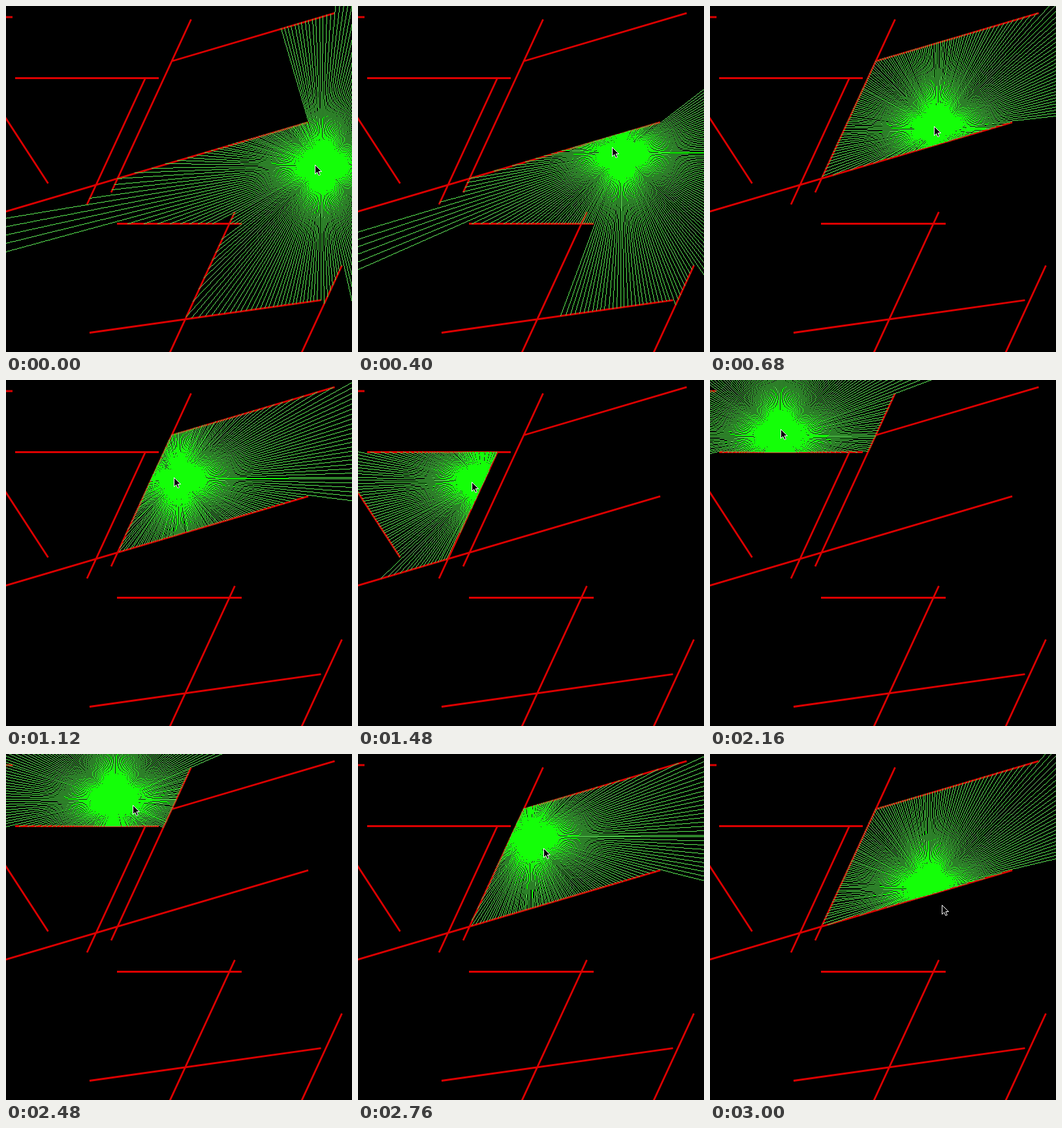
Recreate the animation shown at these times as an HTML page with a canvas. Size 530x530 px, loop 3040 ms.

```html
<!DOCTYPE html>
<html lang="en">
<head>
<meta charset="utf-8">
<title>Ray casting</title>
<style>
  html, body { margin: 0; width: 100%; height: 100%; overflow: hidden; background: #000; }
  canvas { display: block; width: 530px; height: 530px; }
</style>
</head>
<body>
<canvas id="stage" width="530" height="530"></canvas>
<script>
const SIZE = 530, LOOP = 3040, TICK = 40;
const LAG = 65;       // ms the light trails behind the pointer
const STEP = 0.025;   // radians between rays
const REACH = 900;
const GREEN = [20, 255, 8], GREY = 150;

// Most walls share one of three directions
const wall = (x, y, dx, slope) => ({ x, y, dx, dy: dx * slope });
const level = (x, y, width) => wall(x, y, width, 0);
const rising = (x, y, width) => wall(x, y, width, -0.295);
const steep = (x, y, height) => wall(x, y, -height / 2.165, -2.165);

const walls = [
  level(-90, 16.5, 100), level(14, 110, 220), level(170, 333, 191),
  rising(-140, 355.5, 603), rising(254, 84, 249.5),
  steep(283.5, 20, 265), steep(213, 111, 192.5), steep(350.5, 315, 240), steep(514.5, 397, 160),
  wall(-65.5, 71, 130, 1.54), wall(128, 500, 354.5, -0.141)
];

// Key poses: time, light position, lead of the pointer over the light
const path = [
  [0, 483, 244, -10, -1],
  [400, 403, 225, -14, -9],
  [680, 348, 188, -5, -4],
  [1120, 264, 151, -7, -2],
  [1840, 124, 142, -4, -8],
  [2480, 167, 70, 27, 8],
  [3000, 335, 206, 20, 25]
].map(([t, x, y, leadX, leadY]) => ({ t, x, y, vx: leadX / LAG, vy: leadY / LAG }));

const ctx = document.getElementById('stage').getContext('2d');
const layer = new OffscreenCanvas(SIZE, SIZE);
const layerCtx = layer.getContext('2d');
const image = layerCtx.createImageData(SIZE, SIZE);
const lit = new Uint8Array(SIZE * SIZE);

// Aliased line into the light mask
function line(x1, y1, x2, y2) {
  const dx = x2 - x1, dy = y2 - y1;
  const n = Math.max(Math.abs(dx), Math.abs(dy)) || 1;
  for (let i = 0; i <= n; i++) {
    const x = Math.round(x1 + dx * i / n), y = Math.round(y1 + dy * i / n);
    if (x < 0 || y < 0 || x >= SIZE || y >= SIZE) return;
    lit[y * SIZE + x] = 1;
  }
}

// Distance along the ray to the nearest wall
function cast(px, py, ux, uy) {
  let best = REACH;
  for (const w of walls) {
    const det = ux * w.dy - uy * w.dx;
    if (!det) continue;
    const qx = w.x - px, qy = w.y - py;
    const along = (qx * w.dy - qy * w.dx) / det;
    const part = (qx * uy - qy * ux) / det;
    if (along > 0 && part >= 0 && part <= 1) best = Math.min(best, along);
  }
  return best;
}

// Colour is shared by 2x2 blocks, so lone rays look paler than dense ones
function shade() {
  const data = image.data;
  for (let y = 0; y < SIZE; y++) {
    for (let x = 0; x < SIZE; x++) {
      const i = y * SIZE + x, b = (y & ~1) * SIZE + (x & ~1);
      const density = (lit[b] + lit[b + 1] + lit[b + SIZE] + lit[b + SIZE + 1]) / 4;
      const tint = lit[i] ? density : 1;
      for (let c = 0; c < 3; c++) data[i * 4 + c] = GREY + (GREEN[c] - GREY) * tint;
      data[i * 4 + 3] = lit[i] ? 255 : density * 105;
    }
  }
  layerCtx.putImageData(image, 0, 0);
}

// Cubic Hermite value and slope
function hermite(a, b, va, vb, span, s) {
  const ma = va * span, mb = vb * span;
  const c2 = 3 * (b - a) - 2 * ma - mb, c3 = 2 * (a - b) + ma + mb;
  return [
    a + s * (ma + s * (c2 + s * c3)),
    (ma + s * (2 * c2 + s * 3 * c3)) / span
  ];
}

function pose(time) {
  let i = 0;
  while (i < path.length - 2 && time >= path[i + 1].t) i++;
  const p = path[i], q = path[i + 1];
  const span = q.t - p.t, s = (time - p.t) / span;
  const [x, vx] = hermite(p.x, q.x, p.vx, q.vx, span, s);
  const [y, vy] = hermite(p.y, q.y, p.vy, q.vy, span, s);
  return [x, y, x + vx * LAG, y + vy * LAG].map(Math.round);
}

function drawWalls() {
  ctx.strokeStyle = '#dc0000';
  ctx.lineWidth = 2.8;
  ctx.beginPath();
  for (const w of walls) {
    ctx.moveTo(w.x, w.y + 0.5);
    ctx.lineTo(w.x + w.dx, w.y + w.dy + 0.5);
  }
  ctx.stroke();
}

function drawRays(x, y) {
  lit.fill(0);
  for (let a = 0; a < Math.PI * 2; a += STEP) {
    const ux = Math.cos(a), uy = Math.sin(a);
    const d = cast(x, y, ux, uy);
    line(x, y, Math.trunc(x + ux * d), Math.trunc(y + uy * d));
  }
  shade();
  ctx.drawImage(layer, 0, 0);
}

const arrow = new Path2D('M.5 .5V14.5L3.7 11.5L6 16.5L8.3 15.5L6.1 10.5H10.5Z');

function drawPointer(x, y) {
  ctx.save();
  ctx.translate(x, y);
  ctx.fillStyle = '#000';
  ctx.strokeStyle = '#fff';
  ctx.lineWidth = 1;
  ctx.fill(arrow);
  ctx.stroke(arrow);
  ctx.restore();
}

function draw(time) {
  const [x, y, mx, my] = pose(time);
  ctx.fillStyle = '#000';
  ctx.fillRect(0, 0, SIZE, SIZE);
  drawWalls();
  drawRays(x, y);
  drawPointer(mx, my);
}

const start = performance.now();
let shown = -1;
function frame() {
  const time = (performance.now() - start) % LOOP;
  const tick = Math.floor(time / TICK) * TICK;
  if (tick !== shown) draw(shown = tick);
  requestAnimationFrame(frame);
}
frame();
</script>
</body>
</html>
```
